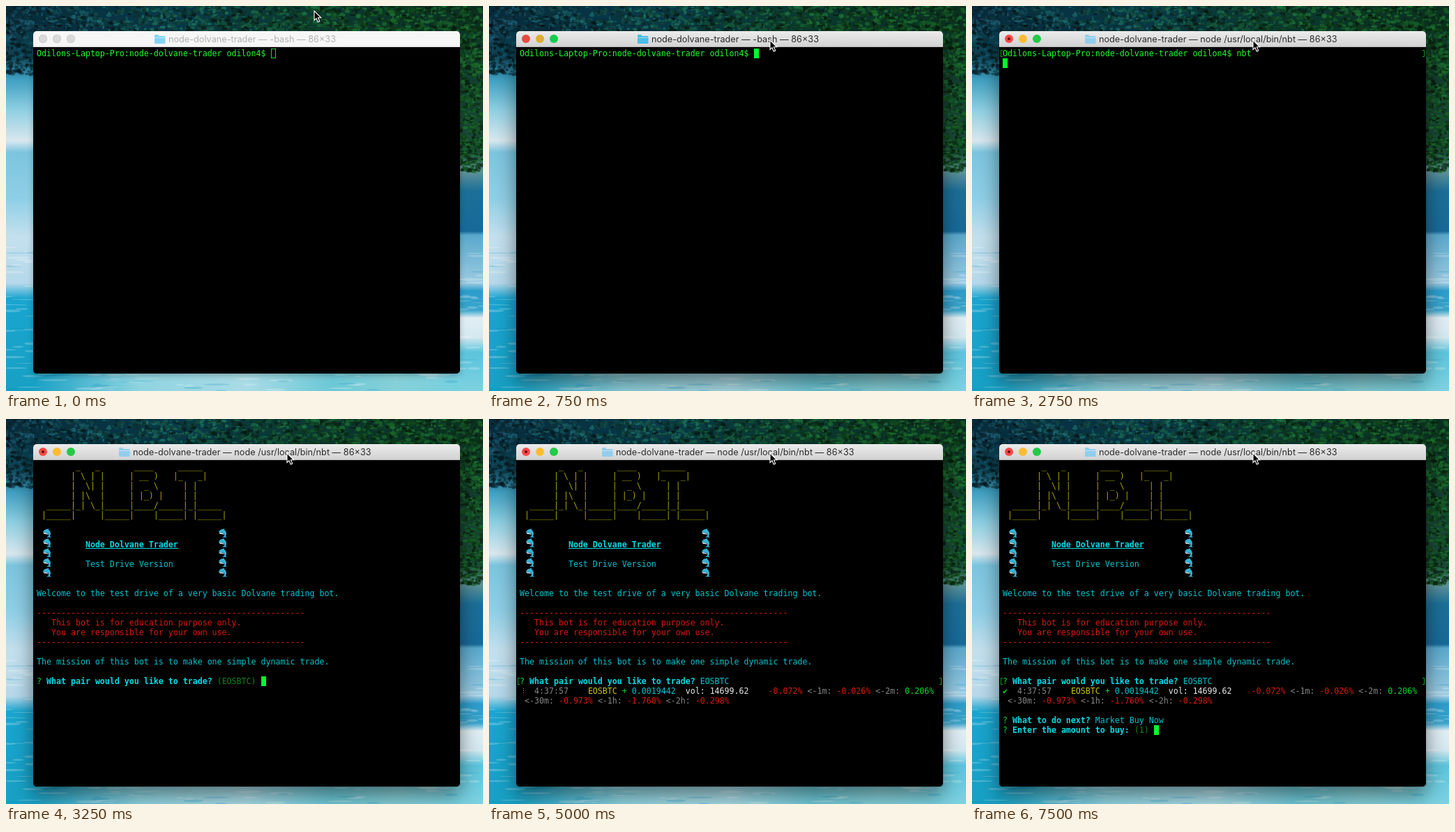
Recreate the animation shown at these times as an HTML page with a canvas. Size 684 px wide and 552 px high, loop 8 s.

```html
<!DOCTYPE html>
<html lang="en">
<head>
<meta charset="utf-8">
<title>Terminal trading bot demo</title>
<style>
html, body { margin: 0; width: 100%; height: 100%; overflow: hidden; }
#stage { position: relative; width: 684px; height: 552px; overflow: hidden; }
#stage > canvas, #art, #pointer { position: absolute; left: 0; top: 0; }
#window {
  position: absolute; left: 39px; top: 36px; width: 612px; height: 491px;
  border-radius: 5px; background: #000; box-shadow: 0 3px 8px rgba(0,0,0,.25);
}
#window.active { box-shadow: 0 0 1px rgba(0,0,0,.5), 0 12px 28px rgba(0,0,0,.48); }
#bar { height: 22px; border-bottom: 1px solid #d8d8d8; border-radius: 5px 5px 0 0; background: #f6f6f6; }
.active #bar { background: linear-gradient(#ebebeb, #d3d3d3); border-color: #b4b4b4; }
.light { position: absolute; top: 5px; width: 12px; height: 12px; border-radius: 50%; background: #dadada; box-shadow: inset 0 0 0 1px #cbcbcb; }
.active .light { background: var(--on); box-shadow: none; }
.running .light { background: var(--run); }
.running #close::after { content: ""; position: absolute; left: 4px; top: 4px; width: 4px; height: 4px; border-radius: 50%; background: #6d0804; }
#title { position: absolute; left: 173px; top: 3px; height: 17px; display: flex; align-items: center; font: 12.7px/17px Inter, sans-serif; color: #b2b2b2; white-space: pre; }
#title svg { margin-right: 4px; color: #83d5f4; }
.active #title { color: #2c2c2c; }
.active #title svg { color: #4abde8; }
.running #title { left: 122px; }
.running #title svg { color: #92cdec; }
#screen { position: absolute; left: 44px; top: 61px; font: 11.627px/14px "DejaVu Sans Mono", monospace; color: #1eff30; white-space: pre; }
#screen div { height: 14px; position: relative; }
#screen i { display: inline-block; width: 7px; height: 14px; font-style: normal; vertical-align: top; }
.block { background: #00fb30; }
.hollow { box-sizing: border-box; border: 1px solid #00e02c; }
.mark { position: absolute; top: 2px; width: 3px; height: 10px; border: 1px solid #0a9c20; box-sizing: border-box; }
.mark.l { left: -3px; border-right: 0; }
.mark.r { left: 602px; border-left: 0; }
.dot { position: absolute; width: 1.4px; height: 1.4px; background: #1ac8d2; }
.gold { color: #aaa300; } .cyan { color: #00c5cf; } .red { color: #d91a0c; }
.ask { color: #00dce6; font-weight: bold; } .ok { color: #00dc2c; }
.dim { color: #12851c; } .gray { color: #858585; } .white { color: #e9e9e9; }
.yellow { color: #c9c511; } .head { color: #00dce6; font-weight: bold; text-decoration: underline; }
</style>
</head>
<body>
<div id="stage">
  <canvas id="sea" width="684" height="552"></canvas>
  <div id="window">
    <div id="bar"></div>
    <span class="light" id="close" style="left:8px;--on:#e24b41;--run:#f94a46"></span>
    <span class="light" style="left:28px;--on:#deae34;--run:#fdbc30"></span>
    <span class="light" style="left:48px;--on:#0dcf4c;--run:#22ca45"></span>
    <div id="title"><svg width="17" height="15"><path fill="currentColor" d="M1 2.5Q1 1 2.5 1H6l1.5 2H15q1.500 0 1.500 1.500V12.500q0 1.500-1.500 1.500H2.500Q1 14 1 12.500Z"/><path stroke="#fff" stroke-opacity=".45" d="M1 5.500H16.500"/></svg><span id="name"></span></div>
  </div>
  <div id="screen"></div>
  <svg id="art" width="684" height="552"></svg>
  <svg id="pointer" width="14" height="20"><path d="M1 1V14.500L4 11.700L6.300 17L8.700 16L6.500 10.800H10.700Z" fill="#000" stroke="#fff" stroke-width="1.100"/></svg>
</div>
<script>
const $ = id => document.getElementById(id);
const LOOP = 8000;

function paintSea() {
  const g = $('sea').getContext('2d');
  let seed = 7;
  const rnd = () => (seed = seed * 16807 % 2147483647) / 2147483647;
  const fill = (x, y, w, h, across, stops) => {
    const grad = across ? g.createLinearGradient(x, 0, x + w, 0) : g.createLinearGradient(0, 0, 0, 552);
    stops.split(' ').forEach(s => { const [at, color] = s.split('#'); grad.addColorStop(+at, '#' + color); });
    g.fillStyle = grad;
    g.fillRect(x, y, w, h);
  };
  const blob = (x, y, rx, ry, color) => {
    g.fillStyle = color;
    g.beginPath();
    g.ellipse(x, y, rx, ry, 0, 0, 7);
    g.fill();
  };
  fill(0, 0, 342, 552, false, '0#06303c .13#0a4557 .19#3f9fc0 .27#8fcfe2 .35#d8e7ee .38#7cc4de .5#8fcfe6 .6#c4e0ee .72#b5d8ea .76#19a5cf 1#18a0c4');
  fill(342, 0, 342, 552, false, '0#0b3326 .38#1b4a3a .43#5f9298 .48#1c6f98 .585#176a98 .595#5aa8cc .72#9ccbe2 .74#2c9dca .79#3aa5cc .81#e0eef4 .86#d4e8f0 .9#5cc4dc 1#7dd2e0');
  fill(39, 520, 612, 32, true, '0#18a0c4 .25#8fd4e0 .5#a9dbe6 .7#6cc8d6 .85#86d0d8 1#76d0df');
  fill(0, 0, 684, 37, true, '0#062c3c .35#08384a .6#0b3a34 1#0b3020');
  const leaf = (x, y) => {
    const hue = 198 - 65 * Math.min(1, x / 520);
    blob(x, y, 1 + rnd() * 3.5, 1 + rnd() * 2, `hsla(${hue},60%,${5 + rnd() * 25}%,.75)`);
  };
  for (let i = 0; i < 1500; i++) leaf(rnd() * 684, rnd() * 38);
  for (let i = 0; i < 160; i++) leaf(rnd() * 40, 36 + rnd() * 62);
  for (let i = 0; i < 500; i++) leaf(650 + rnd() * 34, 36 + rnd() * 202);
  for (let i = 0; i < 420; i++) {
    const x = rnd() * 684, y = 345 + rnd() * 207;
    blob(x, y, 5 + rnd() * 18, .5 + rnd() * 1.5, rnd() < .65 ? 'rgba(255,255,255,.22)' : 'rgba(0,135,185,.2)');
  }
}

function paintDolphins() {
  for (const x of [52, 304]) for (let i = 0; i < 5; i++)
    $('art').innerHTML += `<g transform="translate(${x} ${157 + i * 14.1})">
      <path fill="#35b3d5" d="M1 5C3 1 6 1 7 1L9 0L9 2C12 4 13 8 11 11L13 13L9 12.500L6 13L9 10.500C10 8 8 6 5 6.500Z"/>
      <path fill="#cfeaf2" d="M1 5.500L5 6.500Q8 6 9 9Q6 7.500 3 8Z"/></g>`;
}

const tint = (cls, text) => `<span class="${cls}">${text}</span>`;
const block = '<i class="block"></i>', hollow = '<i class="hollow"></i>';
const marks = '<b class="mark l"></b><b class="mark r"></b>';
const glyph = (cls, char) => `<i class="${cls}">${char}</i>`;
const ask = (text, rest) => tint('ok', '? ') + tint('ask', text) + ' ' + rest;

const prompt = 'Odilons-Laptop-Pro:node-dolvane-trader odilon4$ ';
const rule = tint('red', '-'.repeat(55));
const banner = String.raw`        _   _       ____     _____
       | \ | |     | __ )   |_   _|
       |  \| |     |  _ \     | |
       | |\  |     | |_) |    | |
  _____|_| \_|_____|____/_____|_|_____
 |_____|     |_____|    |_____| |_____|`.split('\n').map(s => tint('gold', s));
const intro = [
  ...banner, '', '',
  ' '.repeat(10) + tint('head', 'Node Dolvane Trader'), '',
  ' '.repeat(10) + tint('cyan', 'Test Drive Version'), '', '',
  tint('cyan', 'Welcome to the test drive of a very basic Dolvane trading bot.'), '',
  rule,
  tint('red', '   This bot is for education purpose only.'),
  tint('red', '   You are responsible for your own use.'),
  rule, '',
  tint('cyan', 'The mission of this bot is to make one simple dynamic trade.'), ''
];
const pair = 'What pair would you like to trade?';
const asked = [...intro, marks + ask(pair, tint('cyan', 'EOSBTC'))];

// Three rows by two columns of dots, read from a braille code point.
function spinner(step) {
  const bits = '⠋⠙⠹⠸⠼⠴⠦⠧⠇⠏'.charCodeAt((1 + 3 * step) % 10) - 0x2800;
  let dots = '';
  for (let b = 0; b < 6; b++) if (bits >> b & 1)
    dots += `<b class="dot" style="left:${b > 2 ? 5 : 2}px;top:${3 + b % 3 * 2.8}px"></b>`;
  return dots + '<i></i>';
}
const loading = step => [...asked, spinner(step) + ' Loading 1 min candles...'];
const change = (label, value) => tint('gray', `&lt;-${label}: `) + tint(value[0] == '-' ? 'red' : 'ok', value) + ' ';
const ticker = sign => [
  ...asked,
  sign + tint('gray', '  4:37:57    ') + tint('yellow', 'EOSBTC ') + tint('ok', '+ ') + tint('cyan', '0.0019442  ') +
    tint('white', 'vol: 14699.62    ') + tint('red', '-0.072% ') + change('1m', '-0.026%') + change('2m', '0.206%'),
  ' ' + change('30m', '-0.973%') + change('1h', '-1.760%') + change('2h', '-0.298%'), ''
];
const done = ticker(glyph('ok', '✔'));
const next = 'What to do next?';
const menu = [
  ...done, ask(next, tint('dim', '(Use arrow keys)')),
  '  Change Pair', glyph('ask', '❯') + tint('cyan', ' Market Buy Now'), '  Quit Bot'
];
const amount = [
  ...done, ask(next, tint('cyan', 'Market Buy Now')),
  ask('Enter the amount to buy:', tint('dim', '(1) ') + block)
];

const steps = [
  [0, [prompt + hollow]],
  [750, [prompt + block]],
  [1250, [prompt]],
  [1500, [prompt + 'clear' + block]],
  [2000, [prompt + 'nbt' + block]],
  [2500, [marks + prompt + 'nbt', block]],
  [3250, [...intro, ask(pair, tint('dim', '(EOSBTC) ') + block)]],
  [4000, loading(0)],
  [4250, loading(1)],
  [4500, ticker(spinner(2))],
  [4750, ticker(spinner(3))],
  [5000, ticker(spinner(4))],
  [5250, [...done, block]],
  [6250, menu],
  [7500, amount]
];
const pointerSteps = [[0, [441, 6]], [250, [402, 47]], [500, [402, 48]]];
const current = (table, t) => table.filter(s => s[0] <= t).pop()[1];

let shown;
function draw(t) {
  const rows = current(steps, t);
  if (rows !== shown) {
    $('screen').innerHTML = rows.map(r => `<div>${r}</div>`).join('');
    shown = rows;
  }
  const running = t >= 2750;
  $('window').className = (t >= 750 ? 'active ' : '') + (running ? 'running' : '');
  const job = running ? 'node /usr/local/bin/nbt' : '-bash';
  $('name').textContent = `node-dolvane-trader — ${job} — 86×33`;
  $('art').style.visibility = t >= 3250 ? 'visible' : 'hidden';
  const [x, y] = current(pointerSteps, t);
  $('pointer').style.transform = `translate(${x}px, ${y}px)`;
}

paintSea();
paintDolphins();
draw(0);
const start = performance.now();
(function tick() {
  draw((performance.now() - start) % LOOP);
  requestAnimationFrame(tick);
})();
</script>
</body>
</html>
```
